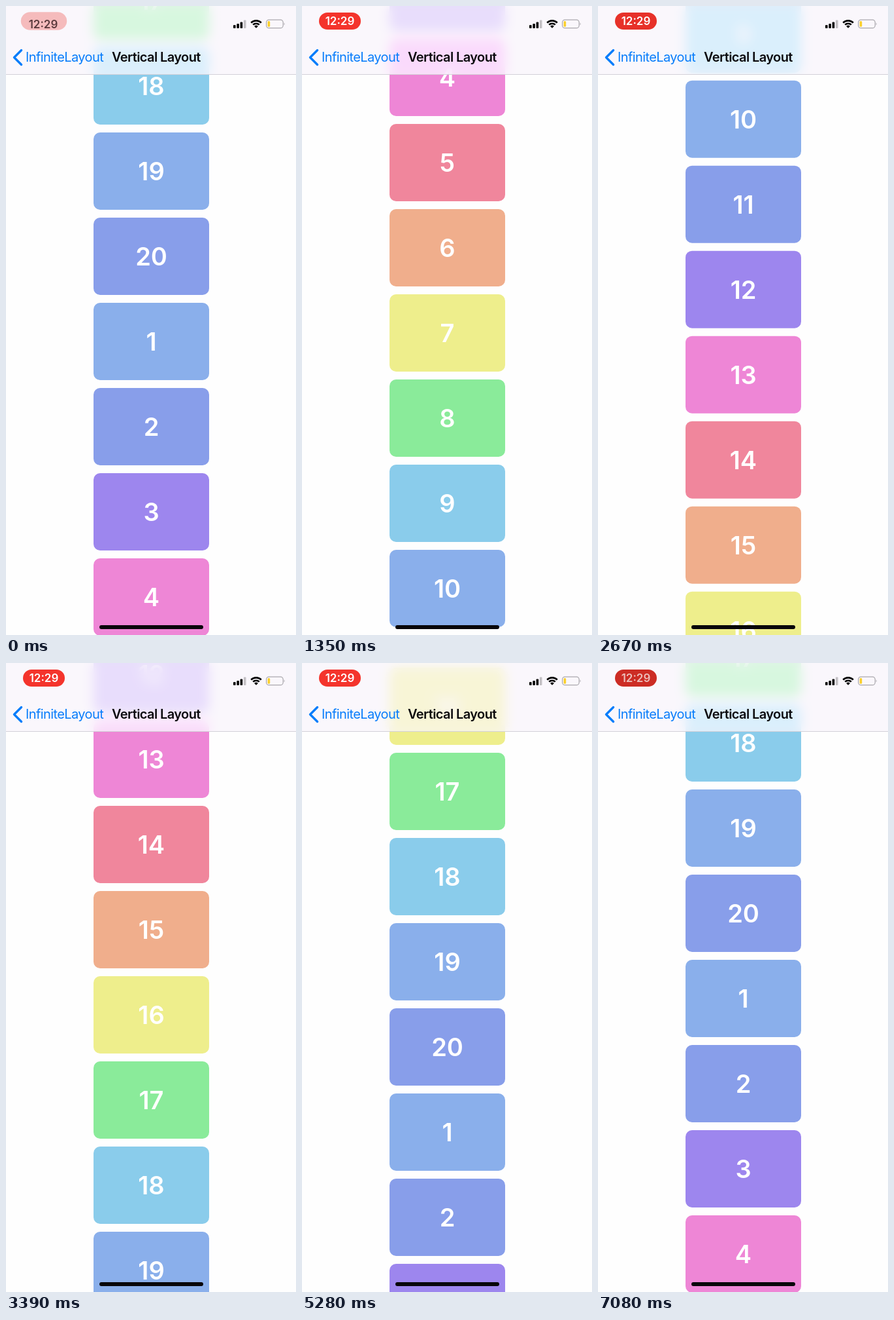
Recreate the animation shown at these times as an HTML page. Size 444x960 px, loop 7.11 s.

```html
<!DOCTYPE html>
<html lang="en">
<head>
<meta charset="utf-8">
<title>Vertical Layout</title>
<style>
  html, body { margin: 0; width: 100%; height: 100%; overflow: hidden; background: #fefefe; }
  body { position: relative; font-family: Inter, Roboto, "Liberation Sans", sans-serif; }
  #stage { position: absolute; left: 0; top: 0; width: 444px; height: 960px; overflow: hidden; background: #fefefe; }
  .card {
    position: absolute; left: 134px; top: 0; width: 177px; height: 118px; border-radius: 10px;
    color: #fff; font-size: 38px; font-weight: 600; line-height: 118px; text-align: center;
  }
  #bar {
    position: absolute; left: 0; top: 0; width: 444px; height: 104px;
    background: rgba(249, 246, 252, .8); border-bottom: 1px solid #d3d1d8;
    -webkit-backdrop-filter: blur(9px) saturate(1.8); backdrop-filter: blur(9px) saturate(1.8);
  }
  .label { position: absolute; top: 64px; line-height: 28px; font-size: 20px; letter-spacing: -.6px; white-space: nowrap; }
  #back { left: 30px; color: #087dfb; }
  #title { left: 162px; color: #0b0a0d; font-weight: 600; }
  #pill { position: absolute; left: 26px; top: 10px; width: 64px; height: 26px; border-radius: 13px; }
  .clock {
    position: absolute; left: 26px; top: 10px; width: 64px; line-height: 26px;
    font-size: 17px; font-weight: 600; text-align: center;
  }
  svg { position: absolute; left: 0; top: 0; }
  #home { position: absolute; left: 143px; top: 945px; width: 159px; height: 6px; border-radius: 3px; background: #08060a; }
</style>
</head>
<body>
<div id="stage">
  <div id="cards"></div>
  <div id="bar"></div>
  <div class="label" id="back">InfiniteLayout</div>
  <div class="label" id="title">Vertical Layout</div>
  <div id="pill"></div>
  <div class="clock" id="idle">12:29</div>
  <div class="clock" id="live">12:29</div>
  <svg width="444" height="104" fill="none">
    <path d="M23.5 67.5L12.5 78.5L23.5 89.5" stroke="#087dfb" stroke-width="3.4" stroke-linecap="round" stroke-linejoin="round"/>
    <g fill="#000">
      <rect x="348" y="29" width="3.6" height="5" rx="1"/>
      <rect x="353.3" y="27" width="3.6" height="7" rx="1"/>
      <rect x="358.6" y="24.5" width="3.6" height="9.5" rx="1"/>
      <rect x="363.9" y="21.5" width="3.6" height="12.5" rx="1" opacity=".22"/>
      <path d="M383 33.8l-2.9-2.9a4.1 4.1 0 0 1 5.8 0z"/>
    </g>
    <path d="M375.2 25.6a11 11 0 0 1 15.6 0M378.2 28.7a6.8 6.8 0 0 1 9.6 0" stroke="#000" stroke-width="2.6"/>
    <rect x="398.6" y="21.1" width="25.6" height="12.6" rx="4" stroke="#aaa8ad" stroke-width="1.2"/>
    <path d="M425.6 25.2q2 2.2 0 4.4z" fill="#aaa8ad"/>
    <rect x="400.6" y="23.1" width="3.6" height="8.6" rx="1.5" fill="#fbd02c"/>
  </svg>
  <div id="home"></div>
</div>
<script>
  const LOOP = 7110, STEP = 30, PITCH = 130, ITEMS = 20;
  const COLORS = ["#8aafeb", "#889eea", "#9d86ee", "#ee86d6", "#f0869c", "#f0ae8c", "#eeee8c", "#8aeb9a", "#8acceb"];
  // [time in ms, scroll offset in px]
  const SCROLL = [
    [0, 0], [240, 0], [1350, 793], [2070, 1193.5], [3390, 1925], [3700, 2185], [4000, 2288],
    [4380, 2350.5], [5280, 2396], [5550, 2408], [5800, 2492], [6100, 2565], [6480, 2600], [LOOP, 2600]
  ];

  const $ = id => document.getElementById(id);
  const clamp = x => Math.min(1, Math.max(0, x));
  const ease = x => x * x * (3 - 2 * x);
  const mod = (a, n) => ((a % n) + n) % n;
  const mix = (a, b, p) => a.map((v, i) => v + (b[i] - v) * p);
  const rgb = c => `rgb(${c.map(Math.round).join()})`;

  // Monotone cubic interpolation
  const slopes = SCROLL.slice(1).map(([t, s], i) => (s - SCROLL[i][1]) / (t - SCROLL[i][0]));
  const tangents = SCROLL.map((_, i) => {
    const a = slopes[i - 1] || 0, b = slopes[i] || 0;
    return a * b > 0 ? 2 * a * b / (a + b) : 0;
  });
  function scrollAt(t) {
    let i = 0;
    while (i < SCROLL.length - 2 && t >= SCROLL[i + 1][0]) i++;
    const [t0, s0] = SCROLL[i], [t1, s1] = SCROLL[i + 1];
    const h = t1 - t0, u = (t - t0) / h, w = 1 - u;
    return s0 * (1 + 2 * u) * w * w + s1 * u * u * (3 - 2 * u)
      + h * u * w * (tangents[i] * w - tangents[i + 1] * u);
  }

  const cards = Array.from({ length: 10 }, () => {
    const el = document.createElement("div");
    el.className = "card";
    $("cards").append(el);
    return el;
  });

  function drawCards(t) {
    const s = scrollAt(t), first = Math.floor((s - 323) / PITCH) - 1;
    cards.forEach((el, i) => {
      const n = first + i, item = mod(n - 1, ITEMS);
      el.textContent = item + 1;
      el.style.background = COLORS[item % COLORS.length];
      el.style.transform = `translateY(${323 + PITCH * n - s}px)`;
    });
  }

  function drawClock(t) {
    const shown = ease(clamp(t / 360));
    const pulse = Math.pow((1 + Math.cos((t - 4380) / 2000 * 2 * Math.PI)) / 2, 2);
    const press = ease(clamp((t - 6600) / 450));
    const dim = Math.max(press, t < 6600 ? pulse * .5 : 0);
    $("pill").style.background = rgb(mix([244, 52, 44], [204, 44, 36], dim));
    $("pill").style.opacity = .3 + .7 * shown;
    $("pill").style.transform = `scale(${1.1 - .1 * shown}, ${1.05 - .05 * shown})`;
    $("idle").style.color = "#5c3c3e";
    $("idle").style.opacity = 1 - shown;
    $("idle").style.transform = `translate(-1px, ${4.5 - 4.5 * shown}px)`;
    $("live").style.color = rgb(mix([255, 255, 255], [236, 190, 186], press));
    $("live").style.opacity = shown;
  }

  function frame(now) {
    const t = Math.floor((now % LOOP) / STEP) * STEP;
    drawCards(t);
    drawClock(t);
  }

  const start = performance.now();
  (function tick() {
    frame(performance.now() - start);
    requestAnimationFrame(tick);
  })();
</script>
</body>
</html>
```
